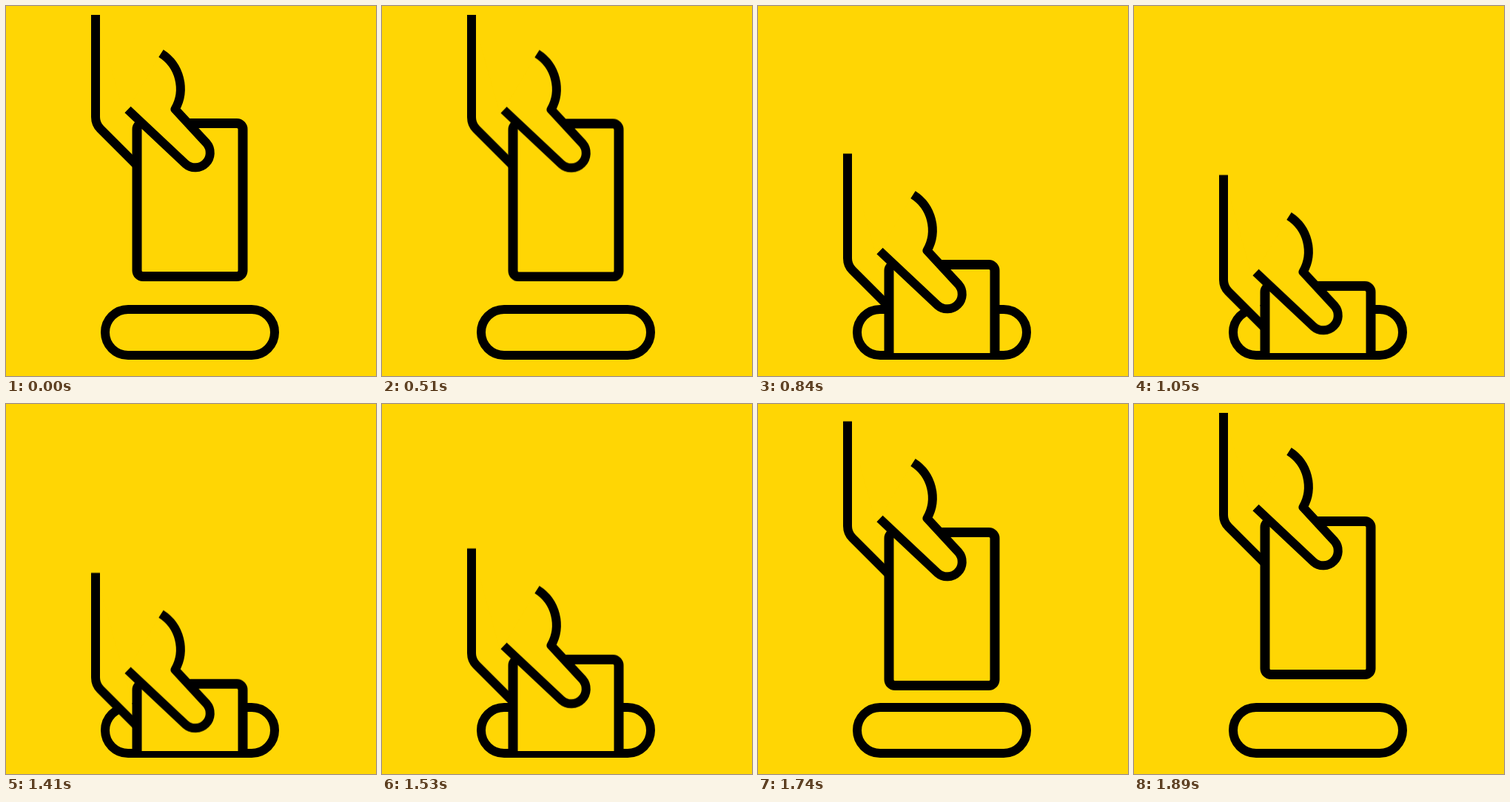
An HTML page that plays this animation: 500 px wide and 500 px high, repeating every 2.34 s.

```html
<!DOCTYPE html>
<html lang="en">
<head>
<meta charset="utf-8">
<title>Card into slot</title>
<style>
  html, body {
    margin: 0;
    height: 100%;
    overflow: hidden;
    background: #ffd604;
  }
  svg {
    display: block;
    width: 100%;
    height: 100%;
    fill: #ffd604;
    stroke: #000;
    stroke-width: 12;
    stroke-linejoin: round;
  }
</style>
</head>
<body>
<svg viewBox="0 0 500 500">
  <clipPath id="opening"><rect y="12" width="500" height="456.5"/></clipPath>
  <rect x="134" y="410" width="229" height="62" rx="31"/>
  <g clip-path="url(#opening)">
    <g id="hand">
      <path d="M121 8.5V150Q121 159.5 127.5 166L180 218.5"/>
      <rect x="177" y="158.5" width="143" height="207" rx="8" stroke-width="13"/>
      <path d="M209.5 64A56.5 56.5 0 0 1 228.5 139.5L271 185.4A20 20 0 0 1 242.7 213.5L164.5 140"/>
    </g>
  </g>
</svg>
<script>
  const LOOP = 2340, STEP = 30, DEPTH = 220;
  const DOWN = [486, 1071], UP = [1392, 1893];

  // Cubic Bézier ease (0.56, 0, 0.19, 1), solved by bisection.
  function ease(x) {
    let low = 0, high = 1, s = 0.5;
    for (let i = 0; i < 24; i++) {
      const r = 1 - s;
      const reached = 3 * r * r * s * 0.56 + 3 * r * s * s * 0.19 + s ** 3;
      if (reached < x) low = s; else high = s;
      s = (low + high) / 2;
    }
    return s * s * (3 - 2 * s);
  }

  function progress(time, [start, end]) {
    if (time <= start) return 0;
    if (time >= end) return 1;
    return ease((time - start) / (end - start));
  }

  // The motion advances in held steps, like film frames.
  const poses = Array.from({ length: LOOP / STEP + 1 }, (_, i) => {
    const time = i * STEP;
    const y = DEPTH * (progress(time, DOWN) - progress(time, UP));
    return { offset: time / LOOP, transform: `translateY(${y.toFixed(2)}px)`, easing: "step-end" };
  });

  document.getElementById("hand").animate(poses, { duration: LOOP, iterations: Infinity });
</script>
</body>
</html>
```
